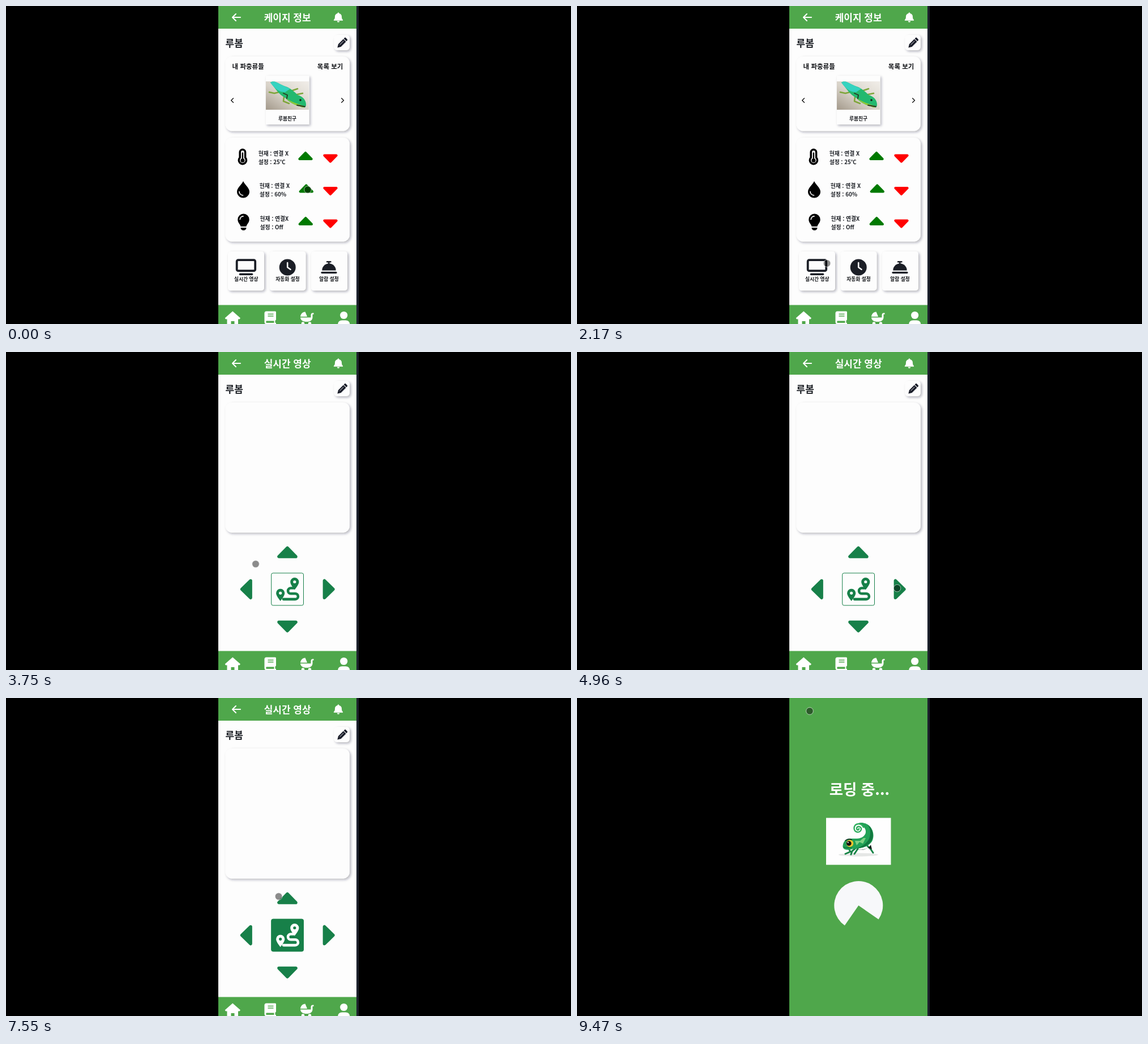
These frames come from a looping animation (998x561 px, 9.51 s). An HTML page:

```html
<!DOCTYPE html>
<html lang="ko">
<head>
<meta charset="utf-8">
<title>케이지 정보</title>
<style>
  html, body { margin: 0; height: 100%; overflow: hidden; background: #000; }
  svg { display: block; width: 100vw; height: 100vh; }
  text { font-family: "Noto Sans CJK KR", "Noto Sans CJK", sans-serif; font-weight: 700; fill: #1d2026; }
  .title { font-size: 17px; }
  .label { font-size: 11.5px; fill: #101216; }
  .row { font-size: 9.75px; }
  .small { font-size: 8.7px; fill: #101216; }
  .white, .white text, text.white { fill: #fff; }
  .line { fill: none; stroke-linecap: round; stroke-linejoin: round; }
  .card { fill: #fdfdfd; filter: url(#shadow); }
  .up { fill: #007a00; stroke: #007a00; }
  .down { fill: #f00; stroke: #f00; }
  .pad { fill: #178049; stroke: #178049; }
</style>
</head>
<body>
<svg viewBox="0 0 998 561">
  <defs>
    <filter id="shadow" x="-20%" y="-20%" width="150%" height="150%">
      <feDropShadow dx="2.2" dy="2.2" stdDeviation="2.2" flood-color="#223" flood-opacity=".32"/>
    </filter>
    <path id="caret" d="M-10.7 5.400H10.700L0-5.600Z" stroke-width="4" stroke-linejoin="round"/>
    <path id="pin" fill-rule="evenodd" d="M0 14C-3 10-7.600 4.500-7.600 0A7.600 7.600 0 0 1 7.600 0C7.600 4.500 3 10 0 14ZM0-2.600A2.600 2.600 0 0 0 0 2.600A2.600 2.600 0 0 0 0-2.600Z"/>
    <clipPath id="photo"><rect x="459" y="133" width="76" height="50"/></clipPath>
    <clipPath id="screen"><rect x="375" width="244" height="561"/></clipPath>
    <linearGradient id="sand" x1="1" y1="0" x2="0" y2="1">
      <stop offset="0" stop-color="#f1eee9"/>
      <stop offset=".55" stop-color="#d8d2c8"/>
      <stop offset="1" stop-color="#a3998b"/>
    </linearGradient>
  </defs>

  <rect width="998" height="561"/>
  <rect x="619" width="4" height="561" fill="#1c212c"/>

  <g clip-path="url(#screen)">
    <g id="page">
      <rect x="375" width="244" height="561" fill="#fdfdfd"/>
      <rect x="375" width="244" height="40" fill="#4fa74b"/>
      <path class="line" d="M414 20H400.500M406 14L400 20L406 26" stroke="#fff" stroke-width="2.100"/>
      <path class="white" d="M587 11.500c.9 0 1.400.6 1.400 1.600c2.800.6 4.600 2.700 4.600 5.600c0 3 .6 4.300 1.900 5.500c.6.700.200 1.600-.7 1.600h-14.400c-.9 0-1.300-.9-.7-1.600c1.300-1.200 1.900-2.500 1.900-5.500c0-2.900 1.800-5 4.600-5.600c0-1 .5-1.600 1.400-1.600ZM584.800 26.600h4.400a2.200 2.200 0 0 1-4.400 0Z"/>
      <text id="heading" class="title white" x="455.700" y="27"></text>
      <text class="title" x="387.500" y="71.500">루봄</text>
      <rect class="card" x="579.500" y="51" width="27.500" height="27" rx="6"/>
      <g fill="#1b1e2a" transform="translate(593.500 65.300) rotate(45)">
        <path d="M-3.300-9.700q0-1.500 1.500-1.500h3.600q1.500 0 1.500 1.500v2h-6.600ZM-3.300-6.700h6.600V6L0 11.500L-3.300 6Z"/>
        <path d="M-.6-4.500V5" stroke="#fff" stroke-width=".8"/>
      </g>

      <g id="cage">
        <rect class="card" x="387.500" y="89" width="219.500" height="131.500" rx="12"/>
        <text class="label" x="399.600" y="110.600">내 파충류들</text>
        <text class="label" x="549.800" y="110.600">목록 보기</text>
        <path class="line" d="M401.500 162.700L397.700 166.500L401.500 170.300M592.700 162.700L596.500 166.500L592.700 170.300" stroke="#111" stroke-width="1.350"/>
        <rect class="card" x="459" y="123" width="76.500" height="86"/>
        <g clip-path="url(#photo)">
          <rect x="459" y="133" width="76" height="50" fill="url(#sand)"/>
          <path class="line" d="M486 151L474 154L465 152M491 160L490 168L500 172M506 149L515 146M514 156L524 154" stroke="#7fa53a" stroke-width="2.500"/>
          <path d="M467 135C474 130 481 137 491 141C502 144 509 151 515 157C524 159 530 166 530 174C530 180 525 180 519 177C510 175 500 170 493 162C482 156 477 147 467 135Z" fill="#23b96f"/>
          <path d="M467 135C474 130 481 137 491 141L502 146L493 152C482 152 475 146 467 135Z" fill="#35d3c0"/>
          <path d="M494 162C504 170 515 172 528 177C526 180 522 179 519 177C510 175 501 170 494 162Z" fill="#8fc936"/>
          <path class="line" d="M490 154L497 157L496 163M514 175L528 177.500" stroke="#293622" stroke-width="1.800"/>
          <circle cx="520" cy="166" r="1.800" fill="#182016"/>
        </g>
        <text class="small" x="481" y="201.600">루봄친구</text>

        <rect class="card" x="387.500" y="232" width="219.500" height="183.500" rx="12"/>
        <g id="readings"></g>

        <path class="line" d="M413.200 258a4.700 4.700 0 0 1 9.400 0v9.500a6.600 6.600 0 1 1-9.400 0Z" stroke="#000" stroke-width="3.500"/>
        <path class="line" d="M417.900 259.500V273" stroke="#000" stroke-width="2.400"/>
        <circle cx="417.900" cy="272.500" r="3.500"/>

        <path d="M419 309C421.500 315 430 321 430 327.500A11 11 0 0 1 408 327.500C408 321 416.500 315 419 309Z"/>
        <path class="line" d="M412 327.500A7 7 0 0 0 418.500 334" stroke="#fff" stroke-width="1.700"/>

        <path d="M419.500 366.500A10.200 10.200 0 0 1 429.700 376.700C429.700 382.500 425 385 424.500 389H414.500C414 385 409.300 382.500 409.300 376.700A10.200 10.200 0 0 1 419.500 366.500ZM414.500 391H424.500C424.500 394 422.500 395.700 419.500 395.700S414.500 394 414.500 391Z"/>
        <path class="line" d="M413.300 376.500A6 6 0 0 1 419 370.800" stroke="#fff" stroke-width="1.700"/>

        <rect class="card" x="392" y="433" width="64" height="69" rx="5"/>
        <rect class="card" x="465.500" y="433" width="64" height="69" rx="5"/>
        <rect class="card" x="539" y="433" width="64" height="69" rx="5"/>
        <g stroke="#1b1e26" fill="none" stroke-linecap="round">
          <rect x="407.700" y="448.200" width="32.500" height="19" rx="2.500" stroke-width="3.800"/>
          <path d="M413.500 473.200H434.500" stroke-width="3.600"/>
          <path d="M558 470.300H583" stroke-width="3.200"/>
          <path d="M567 451.300H573.500M570.300 452V456" stroke-width="2.400"/>
        </g>
        <path d="M558.300 466.500A12.200 12.200 0 0 1 582.700 466.500Z" fill="#1b1e26"/>
        <circle cx="497.200" cy="461" r="14.500" fill="#1b1e26"/>
        <path class="line" d="M497.200 453V461L502.500 464.700" stroke="#fff" stroke-width="2.500"/>
        <text class="small" x="403" y="485">실시간 영상</text>
        <text class="small" x="476.300" y="485">자동화 설정</text>
        <text class="small" x="553.300" y="485">알람 설정</text>
      </g>

      <g id="live">
        <rect class="card" x="387.500" y="89" width="219.500" height="229.500" rx="12"/>
        <use href="#caret" class="pad" transform="translate(497 353.500) scale(1.400)"/>
        <use href="#caret" class="pad" transform="translate(570 418.500) rotate(90) scale(1.400)"/>
        <use href="#caret" class="pad" transform="translate(497 484) rotate(180) scale(1.400)"/>
        <use href="#caret" class="pad" transform="translate(424.500 418.500) rotate(-90) scale(1.400)"/>
        <rect id="routeBox" x="468.700" y="390" width="56.800" height="57" rx="3" stroke="#178049"/>
        <g id="route">
          <use href="#pin" x="509.800" y="405.500"/>
          <use href="#pin" x="484.700" y="425.300"/>
          <path class="line" d="M508 416.500H503a4.900 4.900 0 0 0 0 9.800H511a4.900 4.900 0 0 1 0 9.800H490" stroke="currentColor" stroke-width="4.600"/>
        </g>
      </g>

      <rect x="375" y="527.500" width="244" height="34" fill="#4fa74b"/>
      <g class="white">
        <path d="M400.300 538.500L414 550.500L412.500 552.500H410V563H403.500V556H397.500V563H390.500V552.500H388L386.700 550.500Z"/>
        <path d="M460 538.500H475.500Q477 538.500 477 540V553.500L475.500 555V559H477V561.500H460Q456.500 561 456.500 557.500V542Q456.500 538.500 460 538.500ZM460 555.500Q458.500 557 460 559H473.500V555.500Z" fill-rule="evenodd"/>
        <path d="M462.500 543.500H472.500M462.500 547H472.500" stroke="#4fa74b" stroke-width="1.500"/>
        <path d="M520 548C520.500 543 524 540 528.500 539.500L532 548ZM520 549.500H538.500V545.500Q538.500 541.500 542 541.500H543.500V544H541.500V549.500C541 555 537 557 531 557S520.500 555 520 549.500Z"/>
        <circle cx="524.500" cy="560" r="2.700"/><circle cx="536.500" cy="560" r="2.700"/>
        <circle cx="596.700" cy="545.500" r="6.600"/>
        <path d="M586 563Q586 554.500 593.500 554.500H600Q607.500 554.500 607.500 563Z"/>
      </g>
    </g>

    <g id="loading">
      <rect x="375" width="244" height="561" fill="#4fa74b"/>
      <text class="white" x="445.700" y="170.700" font-size="26.500">로딩 중...</text>
      <rect x="440" y="211.500" width="114.500" height="82.800" fill="#fefefe"/>
      <ellipse cx="497" cy="276.500" rx="35" ry="3" fill="#e5e7e6"/>
      <path class="line" d="M480 266L483 271L474 275M492 265L486 270L484 276M496 266L490 275M513 261L519 267L523 273" stroke="#168447" stroke-width="3"/>
      <path d="M490 264C500 270 513 268 519 259L521 267L514 264C507 269 497 269 490 264Z" fill="#101c17"/>
      <path d="M469.500 261C470 254 475 247.500 483 248C492 248 500 249 506 244C512 239 511 231 505 226C500 222 495 222 491 226C493 220 503 218 511 222C522 227 526 240 522 251C517 262 503 266 488 266C480 269 469 269 469.500 261Z" fill="#22a257"/>
      <path d="M513 223C522 230 525 241 521 250C517 259 506 265 494 265C508 260 515 253 517 245C519 237 518 229 513 223Z" fill="#11783f"/>
      <path d="M491 252L500 252L506 247L510 247L505 257L499 254L494 260Z" fill="#7fd184"/>
      <path class="line" d="M506 228C502 220 491 220 489.500 229C489 238 500 239 502 232C503 226 494 225 494 230C494 233 498 234 498 230.500" stroke="#2fae5e" stroke-width="2.500"/>
      <path class="line" d="M471 263Q477 265.500 485 263.500" stroke="#0d6535" stroke-width="1.200"/>
      <circle cx="482" cy="256.500" r="6.200" fill="#f0c52d"/>
      <circle cx="480.300" cy="256.500" r="4.300" fill="#111"/>
      <circle cx="478.800" cy="254.800" r="1.100" fill="#fff"/>
      <path class="line" d="M474 251.500Q479 247.500 485 250" stroke="#10241a" stroke-width="1.600"/>
      <path id="spinner" d="M0 0L30.400 30.400A43 43 0 1 1 30.400-30.400Z" fill="#f7f8fa"/>
    </g>
    <circle id="cursor" r="6.300" fill="#000" fill-opacity=".45" stroke="#fff" stroke-opacity=".6"/>
  </g>
</svg>
<script>
const LOOP = 9510, SPIN = 750;
const LIVE_LOAD = 2538, LIVE_READY = 3300, TOGGLE = 6900, BACK_LOAD = 9305;
const $ = id => document.getElementById(id);

// Pointer stops: time, x, y
const stops = [
  [0, 533, 324], [500, 532, 326], [1150, 528, 391], [1500, 529, 388],
  [2300, 435, 459], [3200, 435, 459], [3750, 441, 374], [4250, 494, 356],
  [4550, 497, 354], [5000, 567, 418], [5300, 569, 419], [5800, 498, 482],
  [6100, 497, 483], [6420, 488, 447], [6700, 495, 424], [7200, 495, 422],
  [8380, 432, 84], [8850, 411, 23], [LOOP, 411, 23]
];

$('readings').innerHTML = [
  [445.700, 263.500, '현재 : 연결 X', '설정 : 25℃', 529],
  [447.700, 321, '현재 : 연결 X', '설정 : 60%', 530.300],
  [448.500, 378.500, '현재 : 연결X', '설정 : Off', 529.300]
].map(([x, y, now, goal, upX]) => `
  <text class="row" x="${x}" y="${y}">${now}</text>
  <text class="row" x="${x}" y="${y + 15}">${goal}</text>
  <use href="#caret" class="up" transform="translate(${upX} ${y + 1})"/>
  <use href="#caret" class="down" transform="translate(573 ${y + 5.500}) rotate(180)"/>`).join('');

function pointerAt(t) {
  const i = stops.findIndex(stop => stop[0] > t);
  const [t0, x0, y0] = stops[i - 1], [t1, x1, y1] = stops[i];
  const u = (t - t0) / (t1 - t0), k = u * u * (3 - 2 * u);
  return [x0 + (x1 - x0) * k, y0 + (y1 - y0) * k];
}

const show = (id, on) => $(id).style.display = on ? '' : 'none';

function draw(now) {
  const t = now % LOOP;
  const loadStart = t >= BACK_LOAD ? BACK_LOAD : LIVE_LOAD;
  const loading = t >= BACK_LOAD || (t >= LIVE_LOAD && t < LIVE_READY);
  const live = t >= LIVE_READY;
  const active = t >= TOGGLE;

  show('page', !loading);
  show('loading', loading);
  show('cage', !live);
  show('live', live);
  $('heading').textContent = live ? '실시간 영상' : '케이지 정보';

  const ink = active ? '#fff' : '#178049';
  $('routeBox').setAttribute('fill', active ? '#178049' : '#fdfdfd');
  $('route').setAttribute('fill', ink);
  $('route').setAttribute('color', ink);

  const angle = (t - loadStart) / SPIN * 360;
  $('spinner').setAttribute('transform', `translate(497.300 366) rotate(${angle})`);
  $('cursor').setAttribute('transform', `translate(${pointerAt(t)})`);
  requestAnimationFrame(() => draw(performance.now()));
}
draw(performance.now());
</script>
</body>
</html>
```
